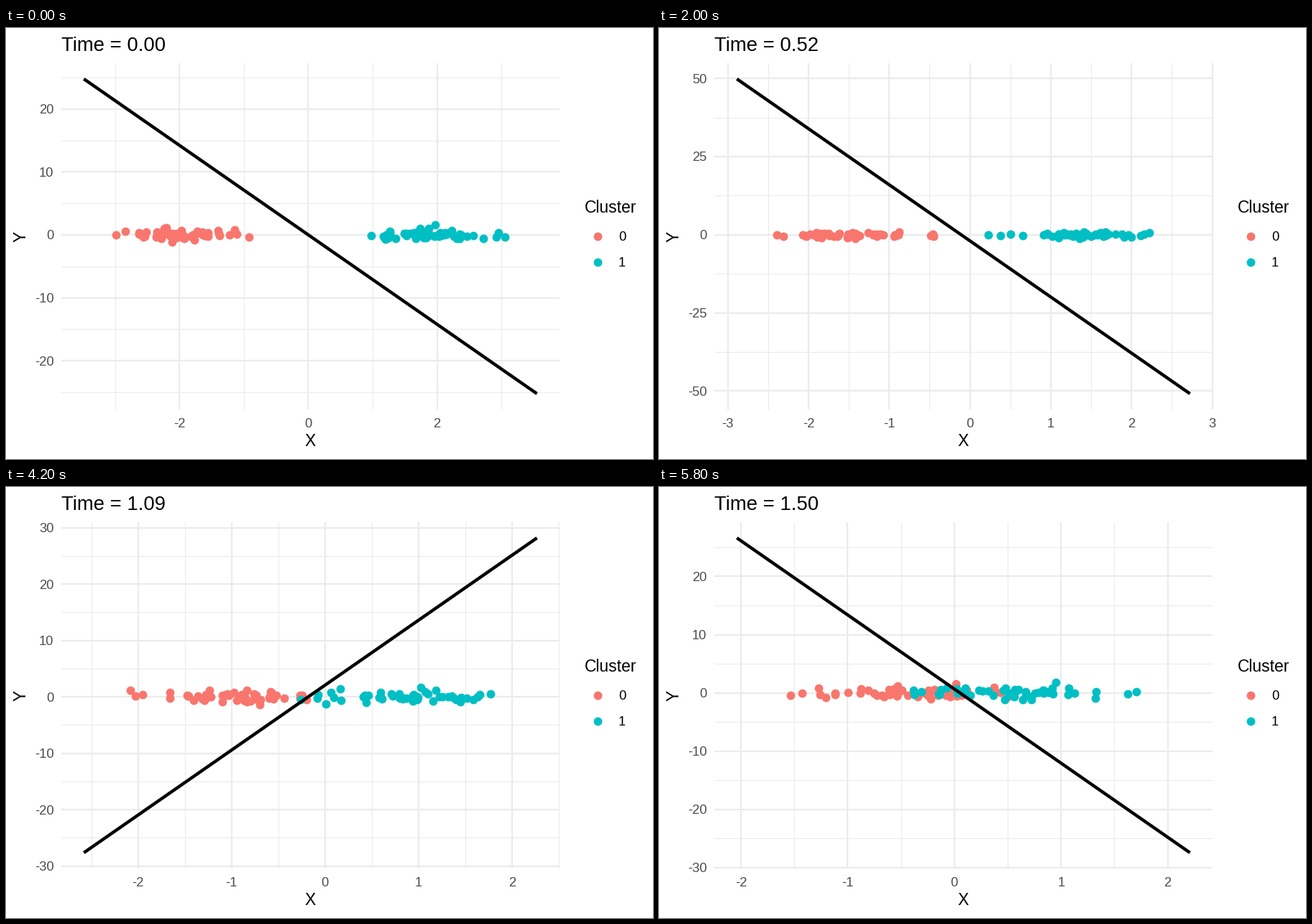
A matplotlib script that plays this animation: 900x600 px, repeating every 6 s.

```python
import math
import numpy as np
import matplotlib.pyplot as plt
from matplotlib.animation import FuncAnimation

W, H, DPI = 900, 600, 150
FRAMES, INTERVAL = 30, 200
N = 50
TOP, BOTTOM, RIGHT = 49.0, 531.0, 770.1
LABEL_LEFT, TICK_GAP = 40.0, 10.3
RED, TEAL, GRID, GREY = "#F8766D", "#00BFC4", "#EBEBEB", "#4D4D4D"
LINE_PT = 2.134
DOT_PT = 5.69
EPS = 2.0 ** -52

plt.rcParams["font.family"] = "Liberation Sans"


def normals(count, seed):
    """Normal deviates by inversion of a Mersenne Twister stream."""
    key = []
    for j in range(675):
        seed = (69069 * seed + 1) % 2 ** 32
        if j > 50:
            key.append(seed)
    gen = np.random.MT19937()
    gen.state = {"bit_generator": "MT19937",
                 "state": {"key": np.array(key, dtype=np.uint32), "pos": 624}}
    u = gen.random_raw(2 * count).astype(float) * 2.3283064365386963e-10
    big = 2.0 ** 27
    p = (np.floor(big * u[0::2]) + u[1::2]) / big
    z = np.linspace(-6, 6, 24001)
    cdf = [0.5 * math.erfc(-v / math.sqrt(2)) for v in z]
    return np.interp(p, cdf, z)


def logistic(x, y, group):
    """Logistic regression by iteratively reweighted least squares."""
    X = np.column_stack([np.ones_like(x), x, y])
    mu = (group + 0.5) / 2
    eta = np.log(mu / (1 - mu))
    slope = mu * (1 - mu)
    old = math.inf
    for _ in range(25):
        w = slope / np.sqrt(mu * (1 - mu))
        z = eta + (group - mu) / slope
        q, r = np.linalg.qr(X * w[:, None])
        coef = np.linalg.solve(r, q.T @ (z * w))
        eta = X @ coef
        e = np.where(eta < -30, EPS,
                     np.where(eta > 30, 1 / EPS, np.exp(np.clip(eta, -30, 30))))
        mu = e / (1 + e)
        slope = np.where(abs(eta) > 30, EPS, e / (1 + e) ** 2)
        dev = -2 * np.sum(np.log(np.where(group == 1, mu, 1 - mu)))
        if abs(dev - old) / (abs(dev) + 0.1) < 1e-8:
            break
        old = dev
    return coef


def breaks(lo, hi, m=5):
    """Extended Wilkinson axis breaks: (values, step)."""
    nice = [1, 5, 2, 2.5, 4, 3]
    span = hi - lo
    best, found = -2, None
    for j in (1, 2):
        for i, q in enumerate(nice):
            for k in range(2, 13):
                z0 = math.ceil(math.log10(span / (k + 1) / j / q))
                for z in (z0, z0 + 1):
                    step = j * q * 10.0 ** z
                    first = math.floor(hi / step) * j - (k - 1) * j
                    last = math.ceil(lo / step) * j
                    for start in range(first, last + 1):
                        a = start * step / j
                        b = a + step * (k - 1)
                        zero = start % j == 0 and a <= 0 <= b
                        simple = 1 - i / 5 - j + zero
                        cover = 1 - 0.5 * ((hi - b) ** 2 + (lo - a) ** 2) / (0.1 * span) ** 2
                        ratio = (max(b, hi) - min(a, lo)) / step / (m - 1)
                        dense = 2 - max(ratio, 1 / ratio)
                        score = 0.25 * simple + 0.2 * cover + 0.5 * dense + 0.05
                        if score > best:
                            best, found = score, (a, step, k)
    a, step, k = found
    return a + step * np.arange(k), step


def axis(lo, hi):
    """Visible range, major breaks, minor breaks and labels."""
    pad = 0.05 * (hi - lo)
    v0, v1 = lo - pad, hi + pad
    major, step = breaks(lo, hi)
    minor = np.append(major - step / 2, major[-1] + step / 2)
    major, minor = [[v for v in s if v0 <= v <= v1] for s in (major, minor)]
    digits = next(d for d in range(9)
                  if all(abs(round(v, d) - v) < 1e-9 * step for v in major))
    labels = [f"{round(v, digits) + 0.0:.{digits}f}" for v in major]
    return v0, v1, major, minor, labels


def label_width(s):
    narrow = {"-": 0.333, ".": 0.278}
    return sum(narrow.get(c, 0.556) for c in s) * 8.8 * DPI / 72


def scene(i):
    t = 1.5 * i / (FRAMES - 1)
    x0, y0, x1, y1 = 0.5 * noise[i]
    x0, x1 = x0 - 2 + t, x1 + 2 - t
    x, y = np.append(x0, x1), np.append(y0, y1)
    b0, b1, b2 = logistic(x, y, np.repeat([0.0, 1.0], N))
    ends = np.array([x.min() - 0.5, x.max() + 0.5])
    line = -(b0 + b1 * ends) / b2
    return (t, x0, y0, x1, y1, ends, line, axis(*ends),
            axis(min(y.min(), line.min()), max(y.max(), line.max())))


noise = normals(FRAMES * 4 * N, 123).reshape(FRAMES, 4, N)
scenes = [scene(i) for i in range(FRAMES)]

fig = plt.figure(figsize=(W / DPI, H / DPI), dpi=DPI, facecolor="white")
ax = fig.add_axes([0, 0, 1, 1])


def text(x, y, s, size, color="black", **kw):
    ax.text(x, y, s, fontsize=size, color=color, va="baseline", **kw)


def dots(x, y, color):
    ax.plot(x, y, "o", ms=DOT_PT, mew=0, color=color, snap=False)


def legend():
    text(804.5, 257, "Cluster", 11)
    for name, color, y in (("0", RED, 289.5), ("1", TEAL, 325.5)):
        dots([822.5], [y], color)
        text(852, y + 6.5, name, 8.8)


def draw(i):
    t, x0, y0, x1, y1, ends, line, xa, ya = scenes[i]
    ax.clear()
    ax.set(xlim=(0, W), ylim=(H, 0))
    ax.axis("off")
    edge = LABEL_LEFT + max(map(label_width, ya[4]))
    left = edge + TICK_GAP

    def px(v):
        return left + (np.asarray(v) - xa[0]) / (xa[1] - xa[0]) * (RIGHT - left)

    def py(v):
        return BOTTOM - (np.asarray(v) - ya[0]) / (ya[1] - ya[0]) * (BOTTOM - TOP)

    for k, lw in ((3, LINE_PT / 4), (2, LINE_PT / 2)):
        ax.hlines(py(ya[k]), left, RIGHT, colors=GRID, lw=lw, zorder=1)
        ax.vlines(px(xa[k]), TOP, BOTTOM, colors=GRID, lw=lw, zorder=1)
    dots(px(x0), py(y0), RED)
    dots(px(x1), py(y1), TEAL)
    ax.plot(px(ends), py(line), color="black", lw=LINE_PT, solid_capstyle="butt")

    for v, s in zip(xa[2], xa[4]):
        text(px(v), 555.5, s, 8.8, GREY, ha="center")
    for v, s in zip(ya[2], ya[4]):
        text(edge, py(v) + 6.5, s, 8.8, GREY, ha="right")
    text((left + RIGHT) / 2, 582, "X", 11, ha="center")
    text(28, (TOP + BOTTOM) / 2, "Y", 11, ha="center", rotation=90,
         rotation_mode="anchor")
    text(left, 31.5, f"Time = {t:.2f}", 13.2)
    legend()
    return []


anim = FuncAnimation(fig, draw, frames=FRAMES, interval=INTERVAL, repeat=True)
plt.show()
```
